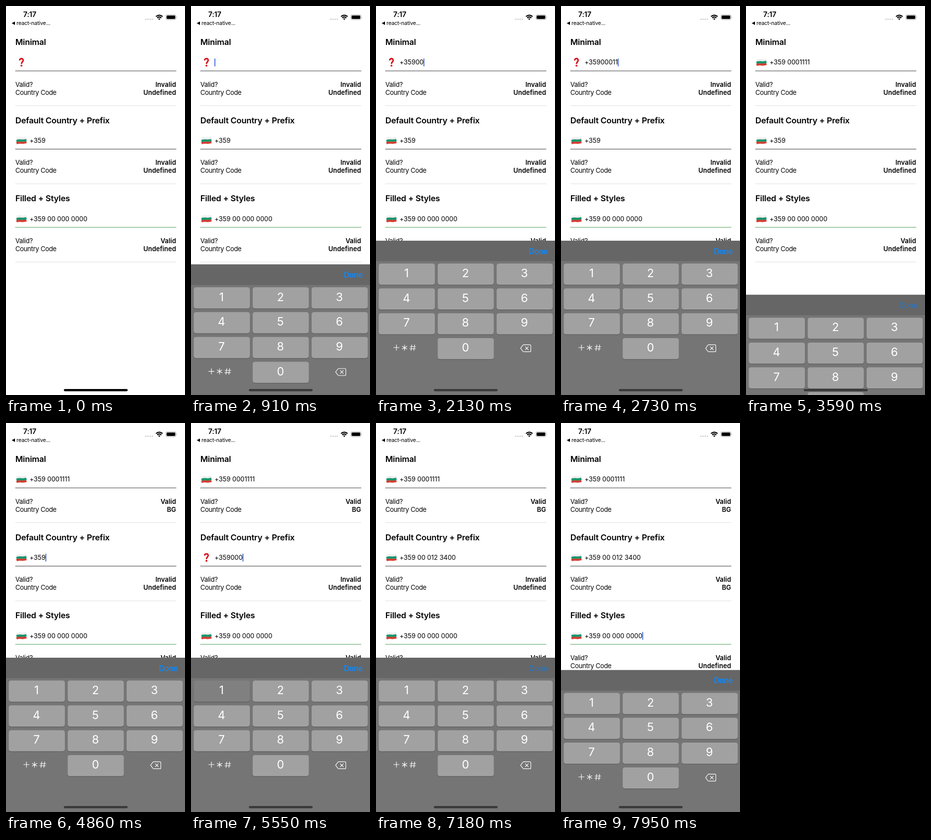
An HTML page for the animation above (8000 ms loop, 359x779 px).

```html
<!DOCTYPE html>
<html lang="en">
<head>
<meta charset="utf-8">
<title>Phone input demo</title>
<style>
  html, body { margin: 0; width: 100%; height: 100%; overflow: hidden; background: #fff; }
  svg { display: block; width: 359px; height: 779px; font-family: Inter, "Open Sans", sans-serif; }
  .title { font-size: 16.6px; font-weight: 600; letter-spacing: -.2px; }
  .label { font-size: 13px; letter-spacing: -.28px; }
  .input { font-size: 13px; letter-spacing: -.07px; }
  .value { font-size: 13px; font-weight: 600; text-anchor: end; }
  .digit { font-size: 23px; fill: #fff; text-anchor: middle; }
  .thin { fill: none; stroke: #fff; stroke-width: 1.15; stroke-linecap: round; stroke-linejoin: round; }
</style>
</head>
<body>
<svg id="stage" viewBox="0 0 359 779"></svg>
<script>
const LOOP = 8000;
const KEYBOARD_TOP = 470, KEYBOARD_HEIGHT = 309;
const stage = document.getElementById('stage');

function add(parent, tag, attrs, text) {
  const el = document.createElementNS('http://www.w3.org/2000/svg', tag);
  for (const name in attrs) el.setAttribute(name, attrs[name]);
  if (text !== undefined) el.textContent = text;
  parent.appendChild(el);
  return el;
}

const clamp = v => Math.min(1, Math.max(0, v));
const easeOut = u => 1 - (1 - u) ** 3;
const progress = (t, start, end) => easeOut(clamp((t - start) / (end - start)));

// Key presses: [key, touch down, touch up]
const fields = [
  {
    title: 'Minimal', number: '3590001111', preset: 0, line: '#3a3a3a',
    keys: [[3, 1270, 1360], [5, 1490, 1550], [9, 1730, 1770], [8, 1950, 1990], [8, 2090, 2130], [8, 2230, 2270],
           [1, 2450, 2490], [1, 2600, 2640], [1, 2750, 2790], [1, 2910, 2950]],
    focus: 770, blur: 3410, fade: [3090, 3270], validAt: 3730
  },
  {
    title: 'Default Country + Prefix', number: '359000123400', preset: 3, line: '#3a3a3a',
    keys: [[8, 4880, 4930], [8, 5040, 5090], [8, 5270, 5360], [1, 5550, 5590], [2, 5730, 5770],
           [3, 5890, 5930], [4, 6050, 6090], [8, 6230, 6290], [8, 6580, 6640]],
    focus: 4550, blur: 7140, fade: [6820, 6950], validAt: 7330
  },
  {
    title: 'Filled + Styles', number: '359000000000', preset: 12, line: '#4c9f55',
    keys: [], focus: 7910, blur: LOOP, fade: [LOOP, LOOP + 1], validAt: LOOP, filled: true
  }
];

// Keyboard visits: shown from `at`, moving over `up`, leaving over `down`
const visits = [
  { at: 770, up: [756, 1090], done: 3410, down: [3561.5, 3781.5] },
  { at: 4550, up: [4534, 4854], done: 7140, down: [7186, 7366] },
  { at: 7910, up: [7769, 8089], done: LOOP, down: [LOOP + 200, LOOP + 400] }
];

function format(digits) {
  const n = digits.slice(3);
  if (!digits) return '';
  if (n.length < 6) return '+' + digits;
  if (n.length < 8) return '+359 ' + n;
  return `+359 ${n.slice(0, 2)} ${n.slice(2, 5)} ${n.slice(5)}`;
}

function drawFlag(parent) {
  const g = add(parent, 'g', { fill: 'none', 'stroke-width': 4.5 });
  const wave = y => `M21 ${y}q5 -1.6 10 -.9t10 -1.1`;
  add(g, 'path', { d: wave(109.4), stroke: '#eff0f0' });
  add(g, 'path', { d: wave(117.9), stroke: '#d53d32' });
  add(g, 'path', { d: wave(113.7), stroke: '#17956c' });
  return g;
}

function drawQuestion(parent) {
  const g = add(parent, 'g', {});
  add(g, 'path', {
    d: 'M27.5 109C27 104.3 34.6 104 34.4 108.6C34.3 112 31 112 31 116',
    fill: 'none', stroke: '#d8121b', 'stroke-width': 3
  });
  add(g, 'circle', { cx: 31, cy: 119.4, r: 1.9, fill: '#d8121b' });
  return g;
}

function drawStatusBar() {
  add(stage, 'text', { x: 34.6, y: 21.5, 'font-size': 14.5, 'font-weight': 600, 'letter-spacing': -.25 }, '7:17');
  add(stage, 'path', { d: 'M11.5 34.5l6.5 -3.4v6.8z' });
  add(stage, 'text', { x: 21, y: 38, 'font-size': 10.8, 'letter-spacing': -.2 }, 'react-native...');
  for (let i = 0; i < 4; i++) add(stage, 'circle', { cx: 280.5 + i * 4.3, cy: 26.6, r: 1.4, fill: '#c8c8c8' });
  add(stage, 'path', {
    d: 'M300.8 21.2q6.6 -5.8 13.2 0M303.2 23.8q4.2 -3.6 8.4 0', fill: 'none', stroke: '#000', 'stroke-width': 2.2
  });
  add(stage, 'path', { d: 'M307.4 28l-2.3 -2.4q2.3 -1.8 4.6 0z' });
  add(stage, 'rect', { x: 320.5, y: 17.5, width: 20.5, height: 10, rx: 3, fill: 'none', stroke: '#aaa' });
  add(stage, 'rect', { x: 322, y: 19, width: 17.5, height: 7, rx: 1.7 });
  add(stage, 'path', { d: 'M342.2 20.7q1.7 1.8 0 3.6z', fill: '#aaa' });
}

function drawField(field, i) {
  const g = add(stage, 'g', { transform: `translate(0 ${i * 156.6})` });
  const rule = (y, stroke) => add(g, 'path', { d: `M18.5 ${y}H341.5`, stroke });
  add(g, 'text', { x: 18.7, y: 78, class: 'title' }, field.title);
  field.flag = drawFlag(g);
  field.question = drawQuestion(g);
  field.input = add(g, 'text', { x: 47.2, y: 117.4, class: 'input' });
  field.caret = add(g, 'rect', { y: 105, width: 1.8, height: 16, rx: .8, fill: '#4069d6' });
  rule(130, field.line);
  add(g, 'text', { x: 18.7, y: 161.7, class: 'label' }, 'Valid?');
  add(g, 'text', { x: 18.7, y: 177.5, class: 'label' }, 'Country Code');
  field.valid = add(g, 'text', { x: 341, y: 161.7, class: 'value' });
  field.country = add(g, 'text', { x: 341, y: 177.5, class: 'value' });
  rule(199.4, '#dedede');
}

const keyCaps = {};
let keyboard, doneLabel, homeBar;

function drawKeyboard() {
  keyboard = add(stage, 'g', {});
  add(keyboard, 'rect', { y: KEYBOARD_TOP, width: 359, height: KEYBOARD_HEIGHT + 1, fill: '#757575' });
  add(keyboard, 'rect', { y: KEYBOARD_TOP, width: 359, height: 41, fill: '#666' });
  doneLabel = add(keyboard, 'text', {
    x: 306.5, y: 496.6, 'font-size': 15.6, 'font-weight': 600, 'letter-spacing': -.5
  }, 'Done');
  [1, 2, 3, 4, 5, 6, 7, 8, 9, 0].forEach((key, i) => {
    const x = 5.4 + (key ? i % 3 : 1) * 118.2;
    const y = 515.8 + Math.floor(i / 3) * 49.7;
    const box = { x, width: 112.8, height: 42.4, rx: 4.6 };
    add(keyboard, 'rect', { ...box, y: y + 1, fill: '#555' });
    keyCaps[key] = add(keyboard, 'rect', { ...box, y });
    add(keyboard, 'text', { x: x + 55.8, y: y + 27.2, class: 'digit' }, key);
  });
  add(keyboard, 'path', {
    class: 'thin',
    d: 'M35.5 684h11M41 678.5v11M57.3 678.7v11M52.5 681.5l9.6 5.5M62.1 681.5l-9.6 5.5' +
       'M71.7 678.5l-1.5 11.5M77.4 678.5l-1.5 11.5M68.4 682.2h11.5M67.7 686.5h11.5'
  });
  add(keyboard, 'path', {
    class: 'thin',
    d: 'M296.5 678.4h12q2 0 2 2v10q0 2 -2 2h-12q-1 0 -1.8 -.8l-4.7 -6.2l4.7 -6.2q.8 -.8 1.8 -.8z' +
       'M299.5 682.4l6 6M305.5 682.4l-6 6'
  });
}

function updateField(field, t) {
  const typed = field.keys.filter(k => t >= k[2]).length;
  const digits = field.number.slice(0, field.preset + typed);
  const known = digits.length >= 9 || (field.preset > 0 && typed === 0);
  const valid = t >= field.validAt;
  const focused = t >= field.focus && t < field.blur;
  field.input.textContent = format(digits);
  field.flag.setAttribute('visibility', known ? 'visible' : 'hidden');
  field.question.setAttribute('visibility', known ? 'hidden' : 'visible');
  field.valid.textContent = valid || field.filled ? 'Valid' : 'Invalid';
  field.country.textContent = valid ? 'BG' : 'Undefined';
  const [from, to] = field.fade;
  field.caret.setAttribute('x', 47 + field.input.getComputedTextLength());
  field.caret.setAttribute('opacity', focused ? 1 - clamp((t - from + 40) / (to - from + 40)) : 0);
}

function updateKeyboard(t) {
  const visit = visits.find(v => t >= v.at && t < v.down[1]);
  keyboard.setAttribute('visibility', visit ? 'visible' : 'hidden');
  homeBar.setAttribute('fill', visit ? '#393939' : '#000');
  if (!visit) return;
  const shown = progress(t, ...visit.up) - progress(t, ...visit.down);
  keyboard.setAttribute('transform', `translate(0 ${KEYBOARD_HEIGHT * (1 - shown)})`);
  doneLabel.setAttribute('fill', t >= visit.done ? '#3373b3' : '#0f88fa');
  for (const key in keyCaps) {
    const pressed = fields.some(f => f.keys.some(k => k[0] == key && t >= k[1] && t < k[2]));
    keyCaps[key].setAttribute('fill', pressed ? '#808080' : '#a1a1a1');
  }
}

function render(t) {
  fields.forEach(field => updateField(field, t));
  updateKeyboard(t);
}

function tick() {
  render(performance.now() % LOOP);
  requestAnimationFrame(tick);
}

drawStatusBar();
fields.forEach(drawField);
drawKeyboard();
homeBar = add(stage, 'rect', { x: 116, y: 767, width: 128, height: 4.6, rx: 2.3 });
tick();
</script>
</body>
</html>
```
